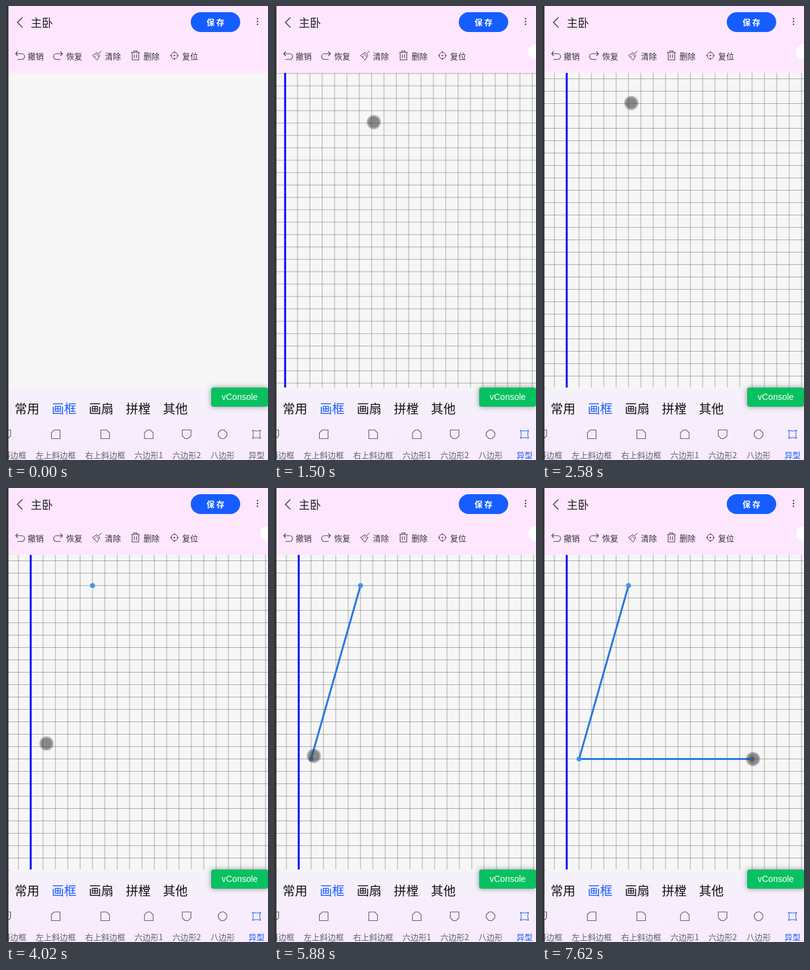
These frames come from a looping animation (424x733 px, 8 s). An HTML page with a canvas:

```html
<!DOCTYPE html>
<html lang="zh-CN">
<head>
<meta charset="utf-8">
<title>画框编辑器</title>
<style>
html, body { margin: 0; width: 100%; height: 100%; overflow: hidden; background: #f6f6f6; }
canvas { display: block; width: 424px; height: 733px; }
</style>
</head>
<body>
<canvas id="stage"></canvas>
<script>
const W = 424, H = 733, LOOP = 8000, STEP = 60, CELL = 20;
const INK = '#46434a', LABEL = '#5b606c', BLUE = '#165dff';
const CJK = '"Noto Sans CJK SC", "Noto Sans CJK", sans-serif';
const canvas = document.getElementById('stage');
const c = canvas.getContext('2d');
const dpr = window.devicePixelRatio || 1;
canvas.width = W * dpr;
canvas.height = H * dpr;

const clamp = v => Math.min(1, Math.max(0, v));
const mix = (a, b, p) => a + (b - a) * p;
const xy = (x, y) => ({ x, y });
const lerp = (a, b, p) => xy(mix(a.x, b.x, p), mix(a.y, b.y, p));

// The drag carries the grid; its origin sits on the blue line
const drag = { from: 2220, to: 2400, by: xy(22, 8.5) };
const home = xy(18, 149);
const origin = t => {
  const p = clamp((t - drag.from) / (drag.to - drag.from));
  return xy(home.x + drag.by.x * p, home.y + drag.by.y * p);
};
const vertex = (col, row) => {
  const o = origin(drag.to);
  return xy(o.x + col * CELL, o.y + row * CELL);
};
const clicks = [
  { time: 3120, ...vertex(5, 0) },
  { time: 4980, ...vertex(1, 14) },
  { time: 7200, ...vertex(15, 14) }
];

// Pointer moves: start, end, destination; it rests in between
const moves = [
  { from: 960, to: 1500, end: xy(161, 187) },
  { from: 1500, to: 1620, end: xy(153, 150) },
  { from: drag.from, to: drag.to, end: xy(175, 158) },
  { from: 2400, to: 2580, end: xy(144, 156) },
  { from: 3120, to: 3540, end: xy(114, 479) },
  { from: 3720, to: 4020, end: xy(65, 412) },
  { from: 4020, to: 4200, end: xy(60, 386) },
  { from: 4200, to: 4860, end: xy(60, 438) },
  { from: 5820, to: 5880, end: xy(64, 432) },
  { from: 5880, to: 6300, end: xy(325, 458) },
  { from: 6660, to: 7140, end: xy(341, 437) }
];

// The pointer swings in from the right edge
function entry(p) {
  const a = xy(423, 73), b = xy(270, 500), d = xy(300, 640), e = xy(404, 712);
  const ab = lerp(a, b, p), bd = lerp(b, d, p), de = lerp(d, e, p);
  return lerp(lerp(ab, bd, p), lerp(bd, de, p), p);
}

function pointer(t) {
  return moves.reduce((pos, m) => lerp(pos, m.end, clamp((t - m.from) / (m.to - m.from))),
    entry(clamp((t - 60) / 540)));
}

function text(s, x, mid, size, color, weight = 400) {
  c.font = `${weight} ${size}px ${CJK}`;
  c.fillStyle = color;
  c.fillText(s, x, mid + size * 0.37);
}

function disc(x, y, r, color) {
  c.fillStyle = color;
  c.beginPath();
  c.arc(x, y, r, 0, 7);
  c.fill();
}

function box(x, y, w, h, r, color) {
  c.fillStyle = color;
  c.beginPath();
  c.roundRect(x, y, w, h, r);
  c.fill();
}

function stroke(d, x, y, color = INK, width = 1.1, flip = 1) {
  c.save();
  c.translate(x, y);
  c.scale(flip, 1);
  c.strokeStyle = color;
  c.lineWidth = width;
  c.stroke(new Path2D(d));
  c.restore();
}

// Square icon; each 1 in the mask cuts a corner, clockwise from top left
function frameIcon(x, mask) {
  const s = 14, [tl, tr, br, bl] = [...mask].map(v => v * 4.5);
  stroke(`M${tl} 0H${s - tr}L${s} ${tr}V${s - br}L${s - br} ${s}H${bl}L0 ${s - bl}V${tl}Z`,
    x, 684.5, LABEL, 1.1);
}

function curvedIcon(x, color) {
  stroke('M1 1Q7 2.5 13 1Q11.5 7 13 13Q7 11.5 1 13Q2.5 7 1 1Z', x, 684.5, color, 1);
  for (const dx of [1, 13]) for (const dy of [1, 13]) disc(x + dx, 684.5 + dy, 1.1, color);
}

const turn = 'M4 0L.7 3.5L4 7M1 3.5H10.5A4.6 4.6 0 0 1 10.5 12.7H3.5';
const tools = [
  ['撤销', x => stroke(turn, x, 73.5)],
  ['恢复', x => stroke(turn, x + 14.5, 73.5, INK, 1.1, -1)],
  ['清除', x => stroke('M14.5 0L9.5 5M7 2.5L12 7.5L10.5 9.5L5.2 4.2ZM5.2 4.2L0 7.5L7.5 15L10.5 9.5M3 10L5.5 8',
    x, 72.5, INK, 1)],
  ['删除', x => stroke('M0 3H14M4.5 3V.5H9.5V3M1.7 3V15H12.3V3M5.2 6V12M8.8 6V12', x, 72)],
  ['复位', x => {
    stroke('M5.2 0A5.2 5.2 0 1 1 -5.2 0A5.2 5.2 0 1 1 5.2 0M0 -7V-4M0 7V4M-7 0H-4M7 0H4', x + 7.5, 80, INK, 1);
    disc(x + 7.5, 80, 1.2, INK);
  }]
];

function header() {
  c.fillStyle = '#ffe6ff';
  c.fillRect(4, 0, W, 108);
  stroke('M8 0L0 8L8 16', 18.5, 18.5, INK, 1.5);
  text('主卧', 40, 27, 18, '#222');
  box(299, 10, 80, 32, 16, BLUE);
  c.textAlign = 'center';
  text('保 存', 339, 26, 13, '#fff', 700);
  c.textAlign = 'left';
  for (let i = -1; i < 2; i++) disc(407, 25 + 4.5 * i, 1.2, INK);
  tools.forEach(([name, icon], i) => {
    const x = 15 + 62.5 * i;
    icon(x);
    text(name, x + 20, 81, 13, '#333');
  });
}

function grid(t) {
  const o = origin(t);
  c.save();
  c.beginPath();
  c.rect(4, 108, W - 4, 512);
  c.clip();
  c.strokeStyle = 'rgba(110,108,112,.55)';
  c.lineWidth = 1;
  c.beginPath();
  for (let x = o.x % CELL; x < W; x += CELL) { c.moveTo(x, 108); c.lineTo(x, 620); }
  for (let y = 100 + o.y % CELL; y < 620; y += CELL) { c.moveTo(4, y); c.lineTo(W, y); }
  c.stroke();
  c.fillStyle = '#00f';
  c.fillRect(o.x - 1.5, 108, 3, 512);
  c.restore();
}

function shape(t) {
  const seen = clicks.filter(p => p.time <= t);
  c.strokeStyle = '#2579de';
  c.lineWidth = 3;
  c.beginPath();
  seen.forEach(p => c.lineTo(p.x, p.y));
  c.stroke();
  seen.forEach(p => disc(p.x, p.y, 4, 'rgba(62,142,232,.92)'));
}

const frames = [
  ['右下斜边框', '0010'], ['左上斜边框', '1000'], ['右上斜边框', '0100'],
  ['六边形1', '1100'], ['六边形2', '0011'], ['八边形', '1111'], ['异型']
];

function panel(active) {
  const g = c.createLinearGradient(0, 616, 0, H);
  g.addColorStop(0, '#f7f6f8');
  g.addColorStop(0.04, '#f5f1fb');
  g.addColorStop(1, '#f9eafd');
  box(4, 616, W - 4, 140, 6, g);
  ['常用', '画框', '画扇', '拼樘', '其他'].forEach((s, i) =>
    text(s, 14 + 60 * i, 651, 20, i === 1 ? BLUE : '#111'));

  // Items flow left to right, centred in cells at least 40 wide
  let x = -32;
  for (const [name, mask] of frames) {
    c.font = `13px ${CJK}`;
    const w = c.measureText(name).width, cell = Math.max(40, w);
    const mid = x + cell / 2;
    const color = active && !mask ? BLUE : LABEL;
    if (mask) frameIcon(mid - 7, mask);
    else curvedIcon(mid - 7, color);
    text(name, mid - w / 2, 725, 13, color);
    x += cell + 15;
  }
}

function consoleButton() {
  c.save();
  c.shadowColor = 'rgba(0,0,0,.4)';
  c.shadowBlur = 8 * dpr;
  box(332, 616, 92, 31, 4, '#07c160');
  c.restore();
  c.font = '14px "Liberation Sans", Arial, sans-serif';
  c.fillStyle = '#fff';
  c.fillText('vConsole', 349, 636);
}

function draw(now) {
  const t = Math.floor(now % LOOP / STEP) * STEP;
  const active = t >= 960;
  c.setTransform(dpr, 0, 0, dpr, 0, 0);
  c.fillStyle = '#f6f6f6';
  c.fillRect(0, 0, W, H);
  header();
  if (active) grid(t);
  shape(t);
  panel(active);
  consoleButton();
  if (t >= 120) disc(423.5, 73.5, 12, '#fff');
  c.fillStyle = '#383639';
  c.fillRect(0, 0, 4, H);
  if (t >= 60) {
    const { x, y } = pointer(t);
    disc(x + 0.5, y + 0.5, 11.5, 'rgba(60,60,60,.34)');
    disc(x + 0.5, y + 0.5, 9.3, 'rgba(60,60,60,.38)');
  }
  requestAnimationFrame(() => draw(performance.now() - start));
}

const start = performance.now();
draw(0);
</script>
</body>
</html>
```
